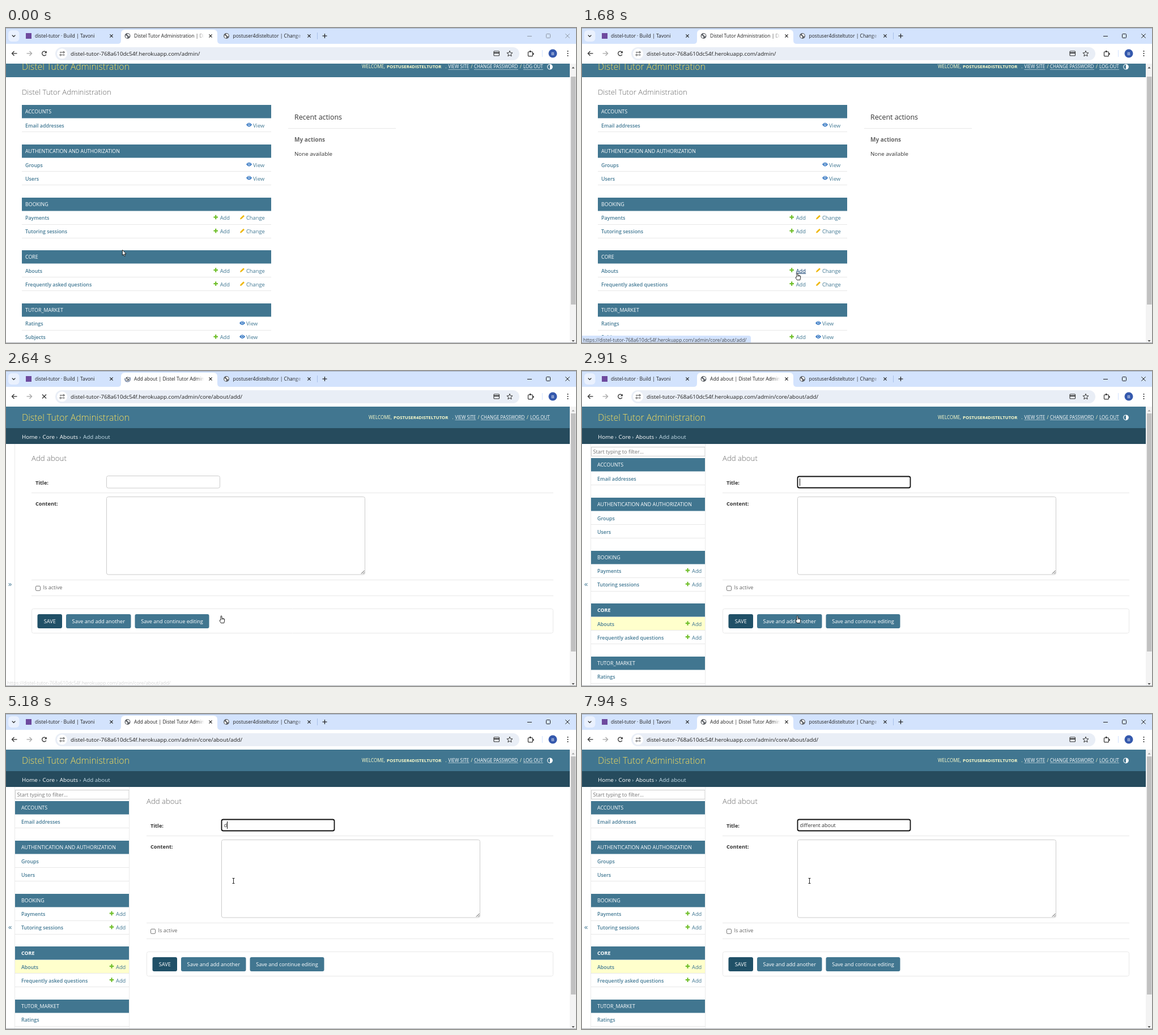
Animation, 1006 px wide and 557 px high, one loop 8 s. Source, as an HTML page with a canvas:

```html
<!DOCTYPE html>
<html lang="en">
<head>
<meta charset="utf-8">
<title>Admin: add about</title>
<style>
html, body { margin: 0; width: 100%; height: 100%; overflow: hidden; background: #fff; }
canvas { display: block; width: 1006px; height: 557px; }
</style>
</head>
<body>
<canvas id="stage" width="1006" height="557"></canvas>
<script>
const ctx = document.getElementById('stage').getContext('2d');
const LOOP = 8000;
const FONT = '"Open Sans", "Noto Sans", sans-serif';
const TEAL = '#417690', LINK = '#417893', DARK = '#1f1f1f', LINE = '#e8e8e8';
const SITE = 'Distel Tutor', USER = 'postuser4disteltutor';
const HOST = 'distel-tutor-768a610dc54f.herokuapp.com/admin/';
const PATH = 'core/about/add/';

// [time, x, y, shape]
const POINTER = [
  [0, 205, 392, 'arrow'], [250, 226, 395, 'arrow'], [370, 300, 408, 'arrow'],
  [490, 372, 422, 'arrow'], [610, 409, 430, 'arrow'], [760, 381, 432, 'hand'],
  [910, 380, 432, 'hand'], [3280, 381, 428, 'arrow'], [3400, 384, 396, 'arrow'],
  [3520, 388, 352, 'beam'], [3640, 391, 314, 'beam'], [3790, 393, 309, 'beam'],
  [3910, 395, 305, 'beam'], [4030, 398, 302, 'beam'], [4190, 401, 295, 'beam']
];
const TYPED = 'different about';
// [time, letters shown]
const KEYS = [
  [0, 0], [5180, 1], [5460, 2], [5740, 3], [5890, 4], [6010, 5], [6130, 6], [6280, 8],
  [6400, 9], [6550, 10], [6700, 11], [6980, 12], [7100, 13], [7230, 14], [7380, 15]
];
// [time, caret visible]
const CARET = [[0, 1], [3280, 0], [3790, 1], [4340, 0], [4740, 1], [7940, 0]];

const MODULES = [
  ['ACCOUNTS', [['Email addresses', 'v']]],
  ['AUTHENTICATION AND AUTHORIZATION', [['Groups', 'v'], ['Users', 'v']]],
  ['BOOKING', [['Payments', 'ac'], ['Tutoring sessions', 'ac']]],
  ['CORE', [['Abouts', 'ac'], ['Frequently asked questions', 'ac']]],
  ['TUTOR_MARKET', [['Ratings', 'w'], ['Subjects', 'aw']]]
];

const at = (steps, t) => steps.filter(s => s[0] <= t).pop();

function text(s, x, y, size, color, weight = 400, align = 'left') {
  ctx.font = `${weight} ${size}px ${FONT}`;
  ctx.textAlign = align;
  ctx.fillStyle = color;
  ctx.fillText(s, x, y);
}
function rect(x, y, w, h, color) {
  ctx.fillStyle = color;
  ctx.fillRect(x, y, w, h);
}
function box(x, y, w, h, r, fill, stroke, width = 1) {
  ctx.beginPath();
  ctx.roundRect(x, y, w, h, r);
  paint(fill, stroke, width);
}
function disc(x, y, r, fill, stroke, width = 1) {
  ctx.beginPath();
  ctx.arc(x, y, r, 0, Math.PI * 2);
  paint(fill, stroke, width);
}
function shape(points, fill, stroke, width = 1, open) {
  ctx.beginPath();
  for (let i = 0; i < points.length; i += 2) ctx.lineTo(points[i], points[i + 1]);
  if (!open) ctx.closePath();
  paint(fill, stroke, width);
}
function paint(fill, stroke, width) {
  if (fill) { ctx.fillStyle = fill; ctx.fill(); }
  if (stroke) { ctx.strokeStyle = stroke; ctx.lineWidth = width; ctx.stroke(); }
}
const line = (points, color, width = 1) => shape(points, null, color, width, true);
function moved(x, y, draw) {
  ctx.save();
  ctx.translate(x, y);
  draw();
  ctx.restore();
}
function cross(x, y, r, color, width = 1) {
  line([x - r, y - r, x + r, y + r], color, width);
  line([x - r, y + r, x + r, y - r], color, width);
}
function plus(x, y, r, color, width) {
  line([x - r, y, x + r, y], color, width);
  line([x, y - r, x, y + r], color, width);
}

// Browser chrome
function globe(x, y, r) {
  moved(x, y, () => {
    ctx.scale(r / 5, r / 5);
    disc(0, 0, 5, '#5f6368');
    shape([-4, -1, -1, 0, 0, 2, -1, 4, -3, 3], '#fff');
    shape([0, -4, 3, -3, 4, 0, 2, 1, 1, -1, -1, -2], '#fff');
  });
}
function tabTitle(s, x, end) {
  const fade = ctx.createLinearGradient(end - 14, 0, end, 0);
  fade.addColorStop(0, DARK);
  fade.addColorStop(1, 'rgba(31,31,31,0)');
  text(s, x, 17, 8.5, fade);
}
function chrome(t) {
  const loading = t >= 1830 && t < 2760;
  const added = t >= 2370;
  rect(0, 0, 1006, 28, '#d3e3fd');
  box(4, 4, 19.5, 20, 6, '#eaf1fe');
  line([10.8, 12.6, 13.6, 15.4, 16.4, 12.6], DARK, 1.3);

  ctx.beginPath();
  ctx.moveTo(197, 28);
  ctx.quadraticCurveTo(203, 28, 203, 22);
  ctx.lineTo(203, 10);
  ctx.quadraticCurveTo(203, 3, 210, 3);
  ctx.lineTo(366, 3);
  ctx.quadraticCurveTo(373, 3, 373, 10);
  ctx.lineTo(373, 22);
  ctx.quadraticCurveTo(373, 28, 379, 28);
  paint('#fff');

  rect(35, 9, 10, 10, '#6e4a9e');
  tabTitle('distel-tutor · Build | Tavoni', 51, 176);
  if (t >= 1830 && t < 2910) {
    const a = Math.floor((t - 1830) / 130) * 0.6 + 2;
    globe(214.5, 14, 3.4);
    ctx.beginPath();
    ctx.arc(214.5, 14, 5, a, a + 4);
    paint(null, '#55698f', 1.1);
  } else globe(214.5, 14, 5);
  tabTitle(added ? `Add about | ${SITE} Admin` : `${SITE} Administration | Distel`, 226, 350);
  globe(389, 14, 5);
  tabTitle(`${USER} | Change user`, 400.5, 524);
  for (const x of [186, 361, 535]) cross(x, 14, 2.6, DARK, 1.1);
  rect(549, 8, 1, 12, '#a8c0e8');
  plus(562.5, 14, 4, DARK, 1.2);

  const control = t < 1680 ? '#8f98a6' : DARK;
  line([920, 14.5, 928, 14.5], control);
  box(953.5, 10.5, 7, 7, 1, null, control);
  cross(991, 14, 3.7, control);

  rect(0, 28, 1006, 35, '#fff');
  const arrow = (x, d, color) => {
    line([x - 4.5, 45, x + 4.5, 45], color, 1.3);
    line([x + d * 0.5, 41, x + d * 4.5, 45, x + d * 0.5, 49], color, 1.3);
  };
  arrow(15, -1, '#333');
  arrow(41, 1, '#a6a6a6');
  if (loading) cross(67.5, 45, 3.5, '#333', 1.3);
  else {
    ctx.beginPath();
    ctx.arc(67.5, 45, 3.8, 0.5, 5.6);
    paint(null, '#333', 1.3);
    shape([71.8, 40.5, 71.8, 44.5, 67.8, 44.5], '#333');
  }

  box(87, 34, 819, 23, 11.5, '#e9eef6');
  disc(99, 45.3, 9, '#fff');
  line([95, 43, 99, 43], '#333', 1.1);
  disc(101.7, 43, 1.4, null, '#333');
  line([99.5, 47.6, 103.5, 47.6], '#333', 1.1);
  disc(96.5, 47.6, 1.4, null, '#333');
  text(HOST + (added ? PATH : ''), 114, 49, 9.77, DARK);

  box(861, 41, 9.5, 8, 1, null, '#333', 1.1);
  rect(861, 43, 9.5, 2, '#333');
  const star = [];
  for (let i = 0; i < 10; i++) {
    const r = i % 2 ? 2.3 : 5.3, a = i * Math.PI / 5 - Math.PI / 2;
    star.push(889 + r * Math.cos(a), 45.6 + r * Math.sin(a));
  }
  shape(star, null, '#333');
  box(921.5, 42, 8, 7.8, 1, null, '#333', 1.2);
  disc(925.3, 41.3, 1.5, '#333');
  disc(930.4, 45.8, 1.5, '#333');
  rect(946, 39, 1, 12, '#d3e3fd');
  disc(965, 45, 7.5, '#3559ad');
  text('B', 965, 48, 8, '#fff', 400, 'center');
  for (const y of [41, 45, 49]) disc(991.5, y, 1.1, '#333');
}

// Page parts
function eye(x, y) {
  ctx.beginPath();
  ctx.moveTo(x - 5, y);
  ctx.quadraticCurveTo(x, y - 7, x + 5, y);
  ctx.quadraticCurveTo(x, y + 7, x - 5, y);
  paint('#2b70bf');
  disc(x, y - 0.3, 2.2, '#fff');
  disc(x, y - 0.3, 1.4, '#2b70bf');
}
function pencil(x, y) {
  shape([x - 4, y + 4, x - 3.3, y + 1.4, x + 2, y - 3.8, x + 4, y - 1.8, x - 1.4, y + 3.3], '#efb80b');
}
function action(kind, x, y, hover) {
  const mid = y - 1;
  if (kind === 'a') plus(x - 7.5, mid, 3.8, '#70bf2b', 2.2);
  if (kind === 'c') pencil(x - 7, mid);
  if (kind === 'v') eye(x - 7, mid);
  const label = { a: 'Add', c: 'Change', v: 'View' }[kind];
  text(label, x, y + 3.5, 9.3, hover ? '#003366' : LINK);
  if (hover) rect(x, y + 4.6, 17.5, 1, '#003366');
}
function modules(x, w, top, side, hover) {
  MODULES.forEach(([name, rows], m) => {
    const y = top + [0, 70, 163.5, 257, 350.7][m];
    const tx = x + (side ? 11 : 6);
    const current = side && name === 'CORE';
    rect(x, Math.round(y), w, 23.5, TEAL);
    text(name, tx, y + 15.4, 8.9, '#fff', current ? 700 : 400);
    rows.forEach(([label, kinds], i) => {
      const mid = y + 36 + 24.1 * i;
      const here = label === 'Abouts';
      if (side && here) rect(x, mid - 12, w, 23.5, '#ffffcc');
      rect(x, Math.round(mid + 11), w, 1, LINE);
      text(label, tx, mid + 3.5, 8.85, LINK, 600);
      for (const k of kinds) {
        if (side) { if (k === 'a') action('a', 194, mid); }
        else if (k === 'a') action('a', 377.7, mid, here && hover);
        else if (k === 'v') action('v', 436, mid);
        else action(k === 'w' ? 'v' : 'c', 424, mid);
      }
    });
  });
}
function header(bottom, y, dx, toggle) {
  rect(0, 63, 995, bottom - 63, TEAL);
  text(`${SITE} Administration`, 28, y + 5.5, 15.9, '#f5dd5d', 300);
  const ty = y + 2.2;
  text('WELCOME,', 628 + dx, ty, 8.1, '#ffffcc');
  text(USER.toUpperCase(), 672 + dx, ty, 7.85, '#ffffcc', 700);
  text('.', 775.5 + dx, ty, 8.1, '#ffffcc');
  const links = [['VIEW SITE', 780.5, 37], ['CHANGE PASSWORD', 826, 78], ['LOG OUT', 913, 35]];
  for (const [s, x, w] of links) {
    text(s, x + dx, ty, 8.05, '#fff');
    rect(x + dx, Math.round(y + 4), w, 1, 'rgba(255,255,255,.5)');
  }
  text('/', 820.5 + dx, ty, 8.1, '#ffffcc');
  text('/', 907 + dx, ty, 8.1, '#ffffcc');
  if (toggle) {
    disc(960, y, 4.3, null, '#fff', 1.1);
    ctx.beginPath();
    ctx.arc(960, y, 4.3, -Math.PI / 2, Math.PI / 2);
    paint('#fff');
  }
}
function scrollbar(top, bottom, upColor) {
  rect(995, 63, 11, 494, '#f3f3f3');
  rect(997, top, 8.5, bottom - top, '#c1c1c1');
  shape([998.5, 71.5, 1003.5, 71.5, 1001, 68.5], upColor);
  shape([998.5, 552, 1003.5, 552, 1001, 555], '#505050');
}
function indexPage(t) {
  header(87, 68.7, 0, true);
  text(`${SITE} Administration`, 28, 117.7, 13.2, '#666', 300);
  modules(28, 440, 136, false, t >= 760);
  text('Recent actions', 509, 162, 12.4, '#333');
  rect(498, 177, 190, 1, LINE);
  text('My actions', 509, 201, 10, '#666', 700);
  text('None available', 509, 226, 9.72, '#333');
  scrollbar(86, 489, '#505050');
}
function button(s, x, w, color) {
  box(x, 430, w, 25, 3, color);
  text(s, x + w / 2, 446, 9.15, '#fff', 400, 'center');
}
function formPage(t) {
  const side = t >= 2760;
  const x = side ? 248 : 45;
  header(101, 82.3, side ? 0 : 12, side);
  rect(0, 101, 995, 28, '#264b5d');
  const crumbs = [['Home', 28], ['Core', 64.5], ['Abouts', 94.7], ['Add about', 136]];
  crumbs.forEach(([s, cx], i) => {
    text(s, cx, 119.7, 9.85, i < 3 ? '#fff' : '#c4dce8');
    if (i) text('›', cx - 6.5, 119.7, 9.85, '#c4dce8');
  });

  rect(15, 129, 1, 428, '#eaeaea');
  text(side ? '«' : '»', 7, 381, 13.5, LINK, 400, 'center');
  if (side) {
    box(16.5, 134.5, 200.5, 16, 0, '#fff', '#ccc');
    text('Start typing to filter...', 19.5, 146.3, 9.15, '#757575');
    modules(16, 202, 154, true);
    rect(217, 129, 1, 428, '#eaeaea');
  }

  text('Add about', x, 159.3, 13.2, '#666', 300);
  text('Title:', x + 7, 200.5, 9.2, '#333', 700);
  if (side) box(x + 132.5, 186.5, 199, 20, 3, '#fff', '#101010', 1.8);
  else box(x + 132.5, 185.5, 200, 21.5, 3, '#fff', '#ccc');
  rect(x, 215, 966 - x, 1, LINE);
  text('Content:', x + 7, 237.5, 9.2, '#333', 700);
  box(x + 132.5, 222.5, 456, 137.5, 3, '#fff', '#ccc');
  line([x + 582, 358.5, x + 587.5, 353], '#444');
  line([x + 585.3, 358.5, x + 587.5, 356.3], '#444');
  rect(x, 369, 966 - x, 1, LINE);
  box(x + 7.5, 380.3, 8, 8, 1.5, '#fff', '#767676');
  text('Is active', x + 20.5, 386.3, 9.1, '#666');
  rect(x, 397, 966 - x, 1, LINE);
  box(x + 0.5, 420.5, 965 - x, 43, 3, null, LINE);
  button('SAVE', x + 10.5, 43.5, '#205067');
  button('Save and add another', x + 61, 114.5, TEAL);
  button('Save and continue editing', x + 182.5, 131, TEAL);

  if (side) {
    const typed = TYPED.slice(0, at(KEYS, t)[1]);
    text(typed, 384.5, 200.2, 9, '#333');
    if (at(CARET, t)[1]) rect(Math.round(384 + ctx.measureText(typed).width), 190, 1, 13, '#111');
  }
  scrollbar(75, 496, '#a3a3a3');
}

function statusBubble(t) {
  if (t < 910 || t >= 2760) return;
  ctx.save();
  if (t < 1030) ctx.globalAlpha = 0.5;
  if (t >= 2640) ctx.globalAlpha = 0.22;
  if (t < 2640) box(-1, 544, 299, 14, [0, 4, 0, 0], '#d3e3fd');
  text('https://' + HOST + PATH, 2, 554.6, 8.4, '#474747');
  ctx.restore();
}

const CURSORS = {
  arrow() {
    shape([0.4, 0.5, 0.4, 10, 2.5, 8, 4, 11.6, 5.6, 10.9, 4.1, 7.5, 7, 7.3], '#fff', '#111', 0.9);
  },
  beam() {
    for (const [color, w] of [['#fff', 2.4], ['#222', 1]]) {
      line([0.5, -4.5, 0.5, 4.5], color, w);
      line([-1.5, -4.5, 2.5, -4.5], color, w);
      line([-1.5, 4.5, 2.5, 4.5], color, w);
    }
  },
  hand() {
    ctx.beginPath();
    ctx.moveTo(-1, 8.5);
    ctx.lineTo(-1, 1.6);
    ctx.quadraticCurveTo(0, 0, 1, 1.6);
    ctx.lineTo(1, 5.2);
    ctx.lineTo(4, 5.8);
    ctx.quadraticCurveTo(5.8, 6, 5.8, 8);
    ctx.lineTo(4.8, 13.6);
    ctx.lineTo(-0.6, 13.6);
    ctx.lineTo(-3, 9.6);
    ctx.quadraticCurveTo(-2.8, 7.4, -1, 8.5);
    ctx.closePath();
    paint('#fff', '#111', 0.9);
    for (const x of [1, 2.6, 4.2]) line([x, 5.5, x, 7.8], '#111', 0.6);
  }
};

function draw(t) {
  rect(0, 0, 1006, 557, '#fff');
  chrome(t);
  ctx.save();
  ctx.beginPath();
  ctx.rect(0, 63, 1006, 494);
  ctx.clip();
  if (t < 2640) indexPage(t); else formPage(t);
  statusBubble(t);
  ctx.restore();
  rect(0, 0, 1006, 1, '#a3b0c4');
  rect(0, 556, 1006, 1, '#a9adb3');
  const [, x, y, kind] = at(POINTER, t);
  moved(x, y, CURSORS[kind]);
}

const start = performance.now();
function tick() {
  draw((performance.now() - start) % LOOP);
  requestAnimationFrame(tick);
}
tick();
</script>
</body>
</html>
```
